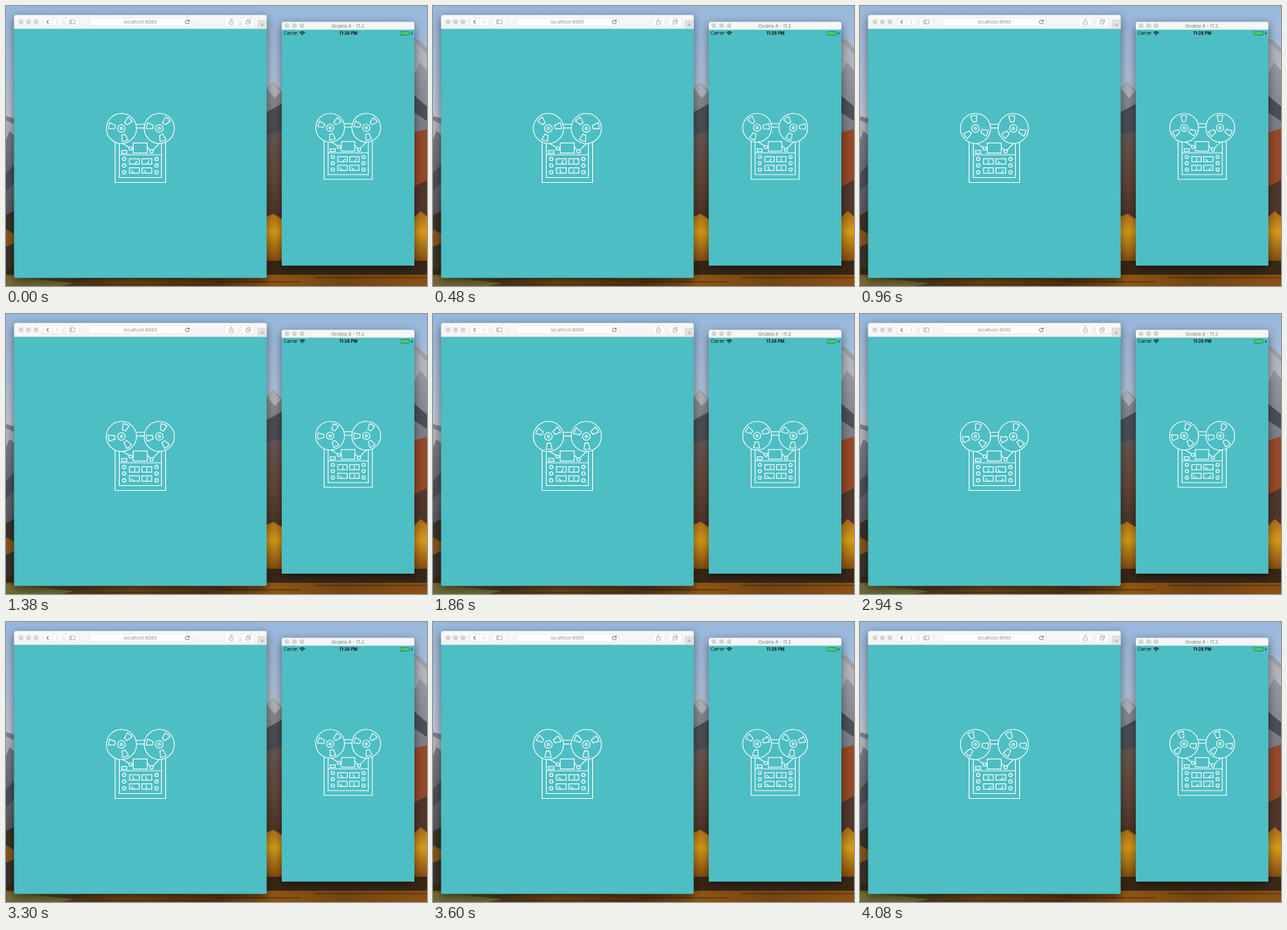
Animation of 600x399 px, one loop 4.14 s. Source, as an HTML page:

```html
<!DOCTYPE html>
<html lang="en">
<head>
<meta charset="utf-8">
<title>Tape recorder</title>
<style>
html, body { margin: 0; width: 100%; height: 100%; overflow: hidden; }
svg { display: block; width: 100%; height: 100%; }
text { font-family: Inter, "Liberation Sans", sans-serif; }
.win { filter: drop-shadow(0 4px 7px #0008); }
.btn { fill: #fdfdfd; stroke: #dcdcdc; stroke-width: .6; }
.icon { fill: none; stroke: #959595; stroke-width: .7; }
.line { fill: none; stroke: #fff; stroke-width: 1.15; }
.spin { transform: rotate(var(--angle)); }
</style>
</head>
<body>
<svg viewBox="0 0 600 399" preserveAspectRatio="none">
  <defs>
    <linearGradient id="sky" x2="0" y2="1">
      <stop stop-color="#98b8dc"/><stop offset=".2" stop-color="#a9bfdc"/><stop offset=".4" stop-color="#bdc6d6"/>
    </linearGradient>
    <linearGradient id="rock" x2="0" y2="1">
      <stop stop-color="#a3a5ae"/><stop offset=".5" stop-color="#7c7e87"/><stop offset="1" stop-color="#55545a"/>
    </linearGradient>
    <linearGradient id="slope" x2="0" y2="1">
      <stop stop-color="#655a58"/><stop offset=".5" stop-color="#65493b"/><stop offset="1" stop-color="#4b3427"/>
    </linearGradient>
    <linearGradient id="gold" x2="0" y2="1">
      <stop stop-color="#a9691c"/><stop offset=".4" stop-color="#d99c19"/><stop offset="1" stop-color="#7f4812"/>
    </linearGradient>
    <linearGradient id="water">
      <stop stop-color="#6b602c"/><stop offset=".16" stop-color="#513a1c"/><stop offset=".3" stop-color="#7a4c15"/>
      <stop offset=".5" stop-color="#5a3614"/><stop offset=".63" stop-color="#8f5713"/>
      <stop offset=".8" stop-color="#744413"/><stop offset="1" stop-color="#8b5115"/>
    </linearGradient>
    <linearGradient id="bar" x2="0" y2="1">
      <stop stop-color="#f8f8f8"/><stop offset="1" stop-color="#f3f3f3"/>
    </linearGradient>
    <g id="lights" fill="#d4d4d4" stroke="#cacaca" stroke-width=".4">
      <circle r="3.2"/><circle cx="10.7" r="3.2"/><circle cx="21.4" r="3.2"/>
    </g>
    <path id="slot" d="M-2.4-9.3L-4.4-18Q0-19 4.4-18L2.4-9.3Z"/>
    <g id="knobs"><circle cy="218" r="2.4"/><circle cy="227.3" r="2.4"/><circle cy="237" r="2.4"/></g>
    <g id="reel">
      <circle r="21.5"/><circle r="5.4"/><circle r="1.7"/>
      <g class="spin">
        <use href="#slot"/><use href="#slot" transform="rotate(120)"/><use href="#slot" transform="rotate(240)"/>
      </g>
    </g>
    <rect id="meter" x="-7" y="-7.6" width="14" height="7.6"/>
    <g id="recorder" class="line">
      <path d="M155.5 194V251.5H227.5V194M161.5 195.5V244.5H221.5V195.5M161.5 212H221.5"/>
      <path d="M185 168.5H198M186 173.8H197"/>
      <rect x="181.3" y="195.2" width="20" height="14.3"/>
      <rect x="164.7" y="206" width="7.5" height="4"/>
      <path d="M165.5 195.5L175.6 201.6M180 203H181.3M219 195.5L209 205.6M201.3 201L205.8 205.8"/>
      <circle cx="177.5" cy="203" r="2.3"/><circle cx="207.6" cy="207.3" r="2.4"/>
      <use href="#knobs" x="168.5"/><use href="#knobs" x="214.5"/>
      <g id="meters"></g>
      <use href="#reel" x="164.5" y="174.5"/><use href="#reel" x="218.5" y="174.5"/>
    </g>
  </defs>

  <!-- Landscape -->
  <rect width="600" height="399" fill="url(#sky)"/>
  <path fill="url(#rock)" d="M0 157L12 160V310H0ZM370 118L381 109L394 122V220H370ZM580 45L590 49L600 60V215H580Z"/>
  <path fill="#b4b6be" d="M0 163L12 168V184L5 178L0 190ZM372 117L381 110L392 122L383 131ZM582 50L600 68V92L590 80L582 96Z"/>
  <path fill="#4e5058" d="M0 238L12 226V252L0 264ZM370 152L394 139V182L370 187ZM582 128L600 143V164L582 152Z"/>
  <path fill="url(#slope)" d="M370 184L394 178V305H370Z"/>
  <path fill="#97492b" d="M582 180L600 175V252L582 261Z"/>
  <path fill="#52382c" d="M582 257L600 248V304H582Z"/>
  <path fill="#39342a" d="M0 298L12 292V386H0Z"/>
  <path fill="#85571f" d="M0 318L12 325V338L0 343Z"/>
  <path fill="url(#gold)" d="M370 301L381 296L394 304V366H370ZM580 303L591 292L600 300V366H580Z"/>
  <path fill="#3a2817" d="M0 376L12 370H370V363H600V388H0Z"/>
  <rect y="383" width="600" height="16" fill="url(#water)"/>
  <path stroke="#38240f" stroke-width="1.6" d="M105 388H260M300 393H420M440 387H600M120 397H290" opacity=".6"/>
  <path fill="#746a38" d="M0 385L40 389L98 395L78 399H0Z"/>

  <!-- Browser -->
  <g class="win">
    <path fill="#4dbec3" d="M11.5 30H371.5V385.5Q371.5 387.5 369.5 387.5H13.5Q11.5 387.5 11.5 385.5Z"/>
    <path fill="url(#bar)" d="M11.5 32.4V16Q11.5 12.7 15 12.7H368Q371.5 12.7 371.5 16V32.4Z"/>
  </g>
  <use href="#lights" x="21.3" y="22.5"/>
  <g class="btn">
    <rect x="52.7" y="16.8" width="27" height="11.4" rx="2"/>
    <rect x="84.7" y="16.8" width="19.5" height="11.4" rx="2"/>
    <rect x="118" y="16.8" width="147" height="11.4" rx="2"/>
    <rect x="311.7" y="16.8" width="19" height="11.4" rx="2"/>
    <rect x="335.2" y="16.8" width="19.2" height="11.4" rx="2"/>
    <path d="M66.2 17V28"/>
    <path d="M359.3 32.4V20.3H371.5V32.4Z" style="fill:#e3e3e3;stroke:#c4c4c4"/>
  </g>
  <g class="icon">
    <path stroke="#333" stroke-width="1" d="M60.8 19.8L58 22.5L60.8 25.2"/>
    <path stroke="#b4b4b4" d="M71.5 19.8L74.3 22.5L71.5 25.2"/>
    <path d="M90.7 19.8H98.3V25.4H90.7ZM93.3 19.8V25.4M91.5 21.5H92.5M91.5 23H92.5"/>
    <path stroke="#444" stroke-width=".8" d="M260.7 21.2A2.7 2.7 0 1 0 261.2 23M261.2 19.3V21.5H259"/>
    <path d="M319.7 21.6H318.4V26H324V21.6H322.7M321.2 24V18.7M319.5 20.3L321.2 18.6L322.9 20.3"/>
    <path d="M342 21.4H346.6V25.7H342ZM343.6 21.2V19.5H348.3V23.8H346.8"/>
    <path d="M362.6 26.8H368M365.3 24.1V29.5"/>
  </g>
  <text x="191.5" y="25" font-size="6.7" fill="#909090" text-anchor="middle">localhost:8080</text>
  <use class="tape" href="#recorder"/>

  <!-- Phone -->
  <g class="win">
    <path fill="#4dbec3" d="M393 32H582V370H393Z"/>
    <path fill="#f6f6f6" d="M393 33.7V25.4Q393 22.4 396 22.4H579Q582 22.4 582 25.4V33.7Z"/>
  </g>
  <use href="#lights" x="400.5" y="28"/>
  <text x="487" y="30.5" font-size="6.7" fill="#7c7c7c" text-anchor="middle">Ondela 8 - 11.2</text>
  <g fill="#111">
    <text x="396" y="41.2" font-size="6">Carrier</text>
    <text x="488" y="41.2" font-size="6" font-weight="700" text-anchor="middle">11:28 PM</text>
    <path d="M578.3 36.8L577 39.4H578.1L577.7 41.4L579.4 38.6H578.3Z"/>
  </g>
  <g fill="none" stroke="#111">
    <path stroke-width="1.3" d="M418.6 38.3Q422.2 35 425.8 38.3M420.2 39.8Q422.2 38 424.2 39.8M421.6 41.1H422.8"/>
    <rect x="562" y="36.6" width="12.4" height="4.9" rx="1" stroke-width=".4"/>
  </g>
  <rect x="562.5" y="37.1" width="11.4" height="3.9" rx=".5" fill="#43d35b"/>
  <use class="tape" href="#recorder" transform="translate(305 7) scale(.954)"/>
</svg>
<script>
const LOOP = 4140, STEP = 60, SPIN = 72;
const startAngles = [43, 49]; // browser, phone
const times = [0, 960, 1380, 2340, 2940, 3600, 4080, 4140];
const meters = [
  { x: 183, y: 225.3, swing: [45, 0, 10, 45, 0, -45, 0, 5] },
  { x: 200.7, y: 225.3, swing: [35, -45, 0, 5, -50, 12, 45, 42] },
  { x: 183, y: 238.2, swing: [-45, 0, -50, -40, -45, -52, 45, 40] },
  { x: 200.7, y: 238.2, swing: [-45, 45, 5, 0, 45, -50, 35, 30] }
];

document.getElementById('meters').innerHTML = meters.map(m =>
  `<g transform="translate(${m.x} ${m.y})"><use href="#meter"/><path class="needle" d="M0-.5V-6"/></g>`).join('');
const needles = document.querySelectorAll('.needle');
const tapes = document.querySelectorAll('.tape');

function needleAngle(swing, t) {
  const i = times.findLastIndex(start => start <= t);
  const u = (t - times[i]) / (times[i + 1] - times[i]);
  const ease = (1 - Math.cos(Math.PI * u)) / 2;
  return swing[i] + (swing[i + 1] - swing[i]) * ease + 10 * Math.sin(2 * Math.PI * u);
}

function draw() {
  const t = Math.floor(performance.now() % LOOP / STEP) * STEP;
  tapes.forEach((tape, i) =>
    tape.style.setProperty('--angle', `${startAngles[i] + SPIN * t / 1000}deg`));
  needles.forEach((needle, i) =>
    needle.setAttribute('transform', `rotate(${needleAngle(meters[i].swing, t)})`));
  requestAnimationFrame(draw);
}
draw();
</script>
</body>
</html>
```
